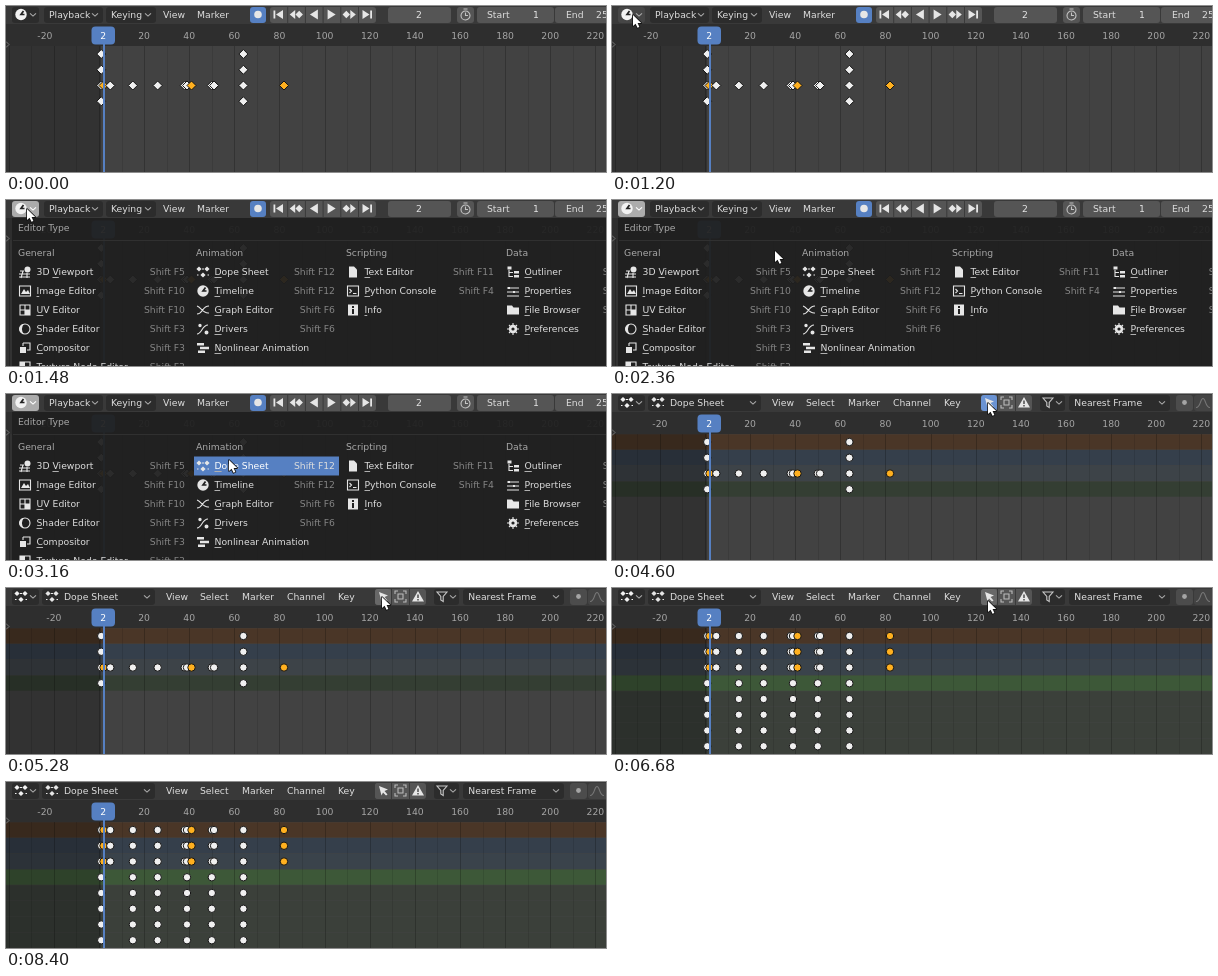
Recreate the animation shown at these times as an HTML page with a canvas. Size 600 by 166 pixels, loop 8840 ms.

```html
<!DOCTYPE html>
<html lang="en">
<head>
<meta charset="utf-8">
<title>Timeline to Dope Sheet</title>
<style>
html, body { margin: 0; width: 100%; height: 100%; overflow: hidden; background: #393939; }
canvas { display: block; }
</style>
</head>
<body>
<canvas id="stage" width="600" height="166"></canvas>
<script>
const c = document.getElementById('stage').getContext('2d');
const LOOP = 8840, STEP = 40;
const BLUE = '#5680c2', WHITE = '#e6e6e6', YELLOW = '#ffb01f';
const MENU_OPEN = 1480, SWITCH = 3320, TIP = 5120, PRESS = 5280, EXPAND = 5320, LEAVE = 6680;

// Each icon: [filled path, stroked path], centred on 0,0.
const dot = (x, y, r) => `M${x - r} ${y}a${r} ${r} 0 1 0 ${2 * r} 0a${r} ${r} 0 1 0 ${-2 * r} 0z`;
const diamond = (x, y, r) => `M${x} ${y - r}l${r} ${r}l${-r} ${r}l${-r} ${-r}z`;
const ICONS = {
  viewport: [dot(2.5, -2.5, 3), 'M-6 2H5M-6 5H5M-2 -1L-4 6M2 1V6M-5 -1H-1'],
  image: ['M-4 3l3 -5l2 3l2 -2l2 4z', 'M-5.5 -5H5.5V5H-5.5z'],
  uv: ['M0 0h5v5h-5z', 'M-5 -5H5V5H-5zM0 -5V5M-5 0H5'],
  shader: ['M-1 -5a5 5 0 0 0 0 10a7 7 0 0 1 0 -10z', dot(0, 0, 5)],
  compositor: ['M-5 -1h6v6h-6z', 'M-2 -5H5V2H2M-2 -5V-2'],
  texture: ['M-5 -5h5v5h5v5h-5v-5h-5z', 'M-5 -5H5V5H-5z'],
  dope: [diamond(-4, -3, 2.6) + diamond(4, -3, 2.6) + diamond(0, 3, 2.6), 'M-1 -3H1M-6 3H-4.5M4.5 3H6'],
  clock: [dot(0, 0, 5.7), ''],
  graph: ['', 'M-6 4C0 4 -1 -4 6 -4M-6 -4C-2 -3 0 4 6 3'],
  driver: [dot(3.5, 3.5, 2) + dot(-3, -3.5, 1.7), 'M-6 5C-1 5 -1 -4 5 -4'],
  nla: ['M-6 -5h7v2.6h-7zM-3 -1.3h9v2.6h-9zM-5 2.4h7v2.6h-7z', ''],
  text: ['M-4 -5.5h5l3 3v8h-8z', ''],
  console: ['', 'M-5.5 -5H5.5V5H-5.5zM-3.5 -2l2 2l-2 2M0 2.5h3.5'],
  info: ['M-5 -5.5h10v11h-10zM-1 -4v2h2v-2zM-1 -1v5h2v-5z', ''],
  outliner: ['M-5.5 -5.5h4v3h-4zM1 -1h5v2.4h-5zM1 3h5v2.4h-5z', 'M-4 -2V4.5H0M-4 .5H0'],
  properties: ['M-5 -4h2v2h-2zM0 0h2v2h-2z', 'M-6 -3H6M-6 1H6M-6 5H6'],
  folder: ['M-6 -4.5h5l1.5 2h5.5v7h-12z', ''],
  gear: [dot(0, 0, 4.2) + dot(0, 0, 1.6), 'M0 -6V-3M0 3V6M-6 0H-3M3 0H6M-4 -4L-2 -2M2 2L4 4M-4 4L-2 2M2 -2L4 -4'],
  chevron: ['', 'M-3 -1.2L0 1.6L3 -1.2'],
  jump: ['M-5 -4h1.8v8h-1.8zM4.5 -4.5v9l-7 -4.5z', ''],
  keyJump: ['M-1 -4.5v9l-5.5 -4.5z' + diamond(3, 0, 3.7), ''],
  play: ['M4 -5v10l-8 -5z', ''],
  stopwatch: ['', dot(0, 1, 4.5) + 'M-2 -5.5H2M0 -2V1L2.5 1'],
  pointer: ['M-4 -4.5L5 -1L1.5 .5L4.5 4L3 5L0 2L-1.5 5z', ''],
  brackets: ['', 'M-2.5 -2.5h5v5h-5zM-5.5 -2.5v-3h3M2.5 -5.5h3v3M5.5 2.5v3h-3M-2.5 5.5h-3v-3'],
  warning: ['M0 -5.5L6 5h-12zM-.8 -2v3.6h1.6v-3.6zM-.8 2.6v1.5h1.6v-1.5z', ''],
  funnel: ['', 'M-5 -4.5h10l-3.8 4.5v5l-2.4 -1.5v-3.5z'],
  ring: [dot(0, 0, 2.4), ''],
  falloff: ['', 'M-7 5C-2 5 -3 -4 0 -4S2 5 7 5'],
};

const MENU = [
  ['General', 12, 179, [['viewport', '3D Viewport', 3, 'Shift F5'], ['image', 'Image Editor', 0, 'Shift F10'],
    ['uv', 'UV Editor', 0, 'Shift F10'], ['shader', 'Shader Editor', 0, 'Shift F3'],
    ['compositor', 'Compositor', 0, 'Shift F3'], ['texture', 'Texture Node Editor', 0, 'Shift F3']]],
  ['Animation', 190, 329, [['dope', 'Dope Sheet', 0, 'Shift F12'], ['clock', 'Timeline', 0, 'Shift F12'],
    ['graph', 'Graph Editor', 0, 'Shift F6'], ['driver', 'Drivers', 0, 'Shift F6'], ['nla', 'Nonlinear Animation', 0, '']]],
  ['Scripting', 340, 488, [['text', 'Text Editor', 0, 'Shift F11'], ['console', 'Python Console', 0, 'Shift F4'],
    ['info', 'Info', 0, '']]],
  ['Data', 500, 632, [['outliner', 'Outliner', 0, 'Shift F9'], ['properties', 'Properties', 0, 'Shift F7'],
    ['folder', 'File Browser', 0, 'Shift F1'], ['gear', 'Preferences', 0, '']]],
];

// Pointer path: time, x, y, power of the easing (negative eases out).
const PATH = [
  [400, 70, 170, 1], [920, 13, 5, -1.8], [1040, 13, 5, 1], [1200, 21, 9, -1.5], [2040, 21, 9, 1],
  [2360, 163, 51, 1.3], [2640, 217, 71, -2], [2880, 214, 62, -2], [3120, 214, 62, 1], [3160, 223, 66, 1],
  [3280, 223, 66, 1], [3320, 223, 70, 1], [3760, 223, 70, 1], [3960, 228, 83, 1.4], [4600, 376, 9, -2],
  [6640, 376, 9, 1], [6680, 376, 13, 1], [7160, 602, 168, 1.5],
];

// Keyed animation frames; negative marks a selected key.
const ENDS = [1, 64];
const ALL = [1, -2, 5, 15, 26, 38, 39, -41, 50, 51, 64, -82];
const BONES = [1, 15, 26, 39, 50, 64];
const frameX = f => 93 + f * 2.256;

function pointerAt(t) {
  const i = PATH.findIndex(p => p[0] > t);
  if (i < 1) return null;
  const [t0, x0, y0] = PATH[i - 1], [t1, x1, y1, k] = PATH[i];
  const p = (t - t0) / (t1 - t0), e = k > 0 ? p ** k : 1 - (1 - p) ** -k;
  return [x0 + (x1 - x0) * e, y0 + (y1 - y0) * e];
}

function rect(x, y, w, h, fill, r = 0) {
  c.fillStyle = fill;
  c.beginPath();
  c.roundRect(x, y, w, h, r);
  c.fill();
}

function text(s, x, y, fill = '#dedede', align = 'left') {
  c.font = '9.25px "DejaVu Sans", sans-serif';
  c.textAlign = align;
  c.fillStyle = fill;
  c.fillText(s, x, y + 3.3);
}

function icon(name, x, y, color = WHITE, flip = 1) {
  const [fill, stroke] = ICONS[name];
  c.save();
  c.translate(x, y);
  c.scale(flip, 1);
  c.fillStyle = c.strokeStyle = color;
  c.lineWidth = 1.1;
  c.fill(new Path2D(fill), 'evenodd');
  c.stroke(new Path2D(stroke));
  if (name === 'clock') {
    c.strokeStyle = '#222';
    c.lineWidth = 1.7;
    c.stroke(new Path2D('M2.5 -3.5L0 0H3.5'));
  }
  c.restore();
}

const button = (x, w, fill = '#555') => rect(x, 1, w, 16, fill, 3);

function dropdown(label, x, w, textX) {
  button(x, w, '#2c2c2c');
  text(label, textX, 8.5);
  icon('chevron', x + w - 8, 8.5, '#aaa');
}

function editorButton(name, fill, arrow = '#aaa') {
  button(6, 27, fill);
  icon(name, 15, 8.5, '#f2f2f2');
  icon('chevron', 27, 8.5, arrow);
}

function timelineHeader(t) {
  if (t >= MENU_OPEN) editorButton('clock', '#acacac', '#fff');
  else editorButton('clock', t >= 880 ? '#464646' : '#2c2c2c');
  dropdown('Playback', 38, 59, 43);
  dropdown('Keying', 100, 50, 105);
  text('View', 157, 8.5);
  text('Marker', 191, 8.5);
  button(244, 16, BLUE);
  c.fillStyle = WHITE;
  c.fill(new Path2D(dot(252, 8.5, 3.8)));
  button(264, 106);
  ['jump', 'keyJump', 'play', 'play', 'keyJump', 'jump'].forEach((name, i) => {
    if (i) rect(263.5 + i * 17.7, 1, 1, 16, '#3a3a3a');
    icon(name, 272.5 + i * 17.7, 8.5, WHITE, i < 3 ? 1 : -1);
  });
  button(382, 63);
  text('2', 413, 8.5, WHITE, 'center');
  button(451, 17);
  icon('stopwatch', 459.5, 8.5, '#c4c4c4');
  button(471, 77);
  text('Start', 481, 8.5);
  text('1', 533, 8.5, WHITE, 'right');
  button(549, 70);
  text('End', 560, 8.5);
  text('250', 590, 8.5);
}

function dopeHeader(t) {
  editorButton('dope', '#2c2c2c');
  dropdown('Dope Sheet', 36, 113, 58);
  icon('dope', 46, 8.5);
  [['View', 160], ['Select', 194], ['Marker', 236], ['Channel', 281], ['Key', 332]]
    .forEach(([label, x]) => text(label, x, 8.5));
  button(369, 51);
  const hover = t >= 4520 && t < LEAVE + 80;
  button(369, 16, t < PRESS ? (hover ? '#6a93d3' : BLUE) : hover ? '#686868' : '#555');
  rect(385, 1, 1, 16, '#3a3a3a');
  rect(403, 1, 1, 16, '#3a3a3a');
  icon('pointer', 377, 8.5);
  icon('brackets', 394.5, 8.5, '#bbb');
  icon('warning', 412, 8.5);
  button(428, 25, '#2c2c2c');
  icon('funnel', 436, 8.5, '#c8c8c8');
  icon('chevron', 447, 8.5, '#aaa');
  dropdown('Nearest Frame', 457, 101, 462.3);
  button(564, 17, '#4c4c4c');
  icon('ring', 572.5, 8.5, '#a4a4a4');
  button(582, 24, '#444');
  icon('falloff', 591, 8.5, '#777');
}

function key(frame, y, round) {
  const x = frameX(Math.abs(frame));
  c.fillStyle = frame < 0 ? YELLOW : '#f0f0f0';
  c.strokeStyle = '#151515';
  c.lineWidth = 1;
  const shape = new Path2D(round ? dot(x, y, 3.7) : diamond(x, y, 4.5));
  c.fill(shape);
  c.stroke(shape);
}

function editor(t) {
  const round = t >= SWITCH, expanded = t >= EXPAND, rowY = i => 48 + i * 15.75;
  rect(0, 18, 600, 148, '#424242');
  if (round) {
    const tints = expanded
      ? ['#4a3627', '#353f4b', '#3a434b', '#3d5838', '#3b403a', '#3b403a', '#3b403a', '#3b403a']
      : ['#4a3627', '#353f4b', '#3d4348', '#343e33'];
    tints.forEach((tint, i) => rect(0, rowY(i) - 7.8, 600, 15.3, tint));
  }
  rect(0, 40, 95, 126, 'rgba(0,0,0,.25)');
  for (let f = -40; f <= 220; f += 10)
    rect(Math.round(frameX(f)), 40, 1, 126, f % 20 ? 'rgba(0,0,0,.1)' : 'rgba(0,0,0,.22)');

  rect(0, 18, 600, 22, '#2e2e2e');
  const blink = t >= 160 && t < 280 || t >= 8320 && t < 8400;
  const shifted = (t < SWITCH || t >= LEAVE + 40) && !blink;
  for (let f = -20; f <= 220; f += 20)
    if (f) text(f, frameX(f) - (f < 0 && shifted ? 9 : 0), 30, '#a6a6a6', 'center');

  const rows = expanded ? [ALL, ALL, ALL, BONES, BONES, BONES, BONES, BONES] : [ENDS, ENDS, ALL, ENDS];
  rows.forEach((row, i) => row.forEach(frame => key(frame, rowY(i), round)));
  rect(97, 38, 2, 128, BLUE);
  rect(85.5, 20.5, 23.5, 18, BLUE, 4);
  text('2', 97.3, 29.8, '#fff', 'center');
  c.strokeStyle = '#777';
  c.lineWidth = 1;
  c.stroke(new Path2D('M0 35.5L3 38.5L0 41.5'));
}

function menu(pointer) {
  rect(6, 18, 600, 150, 'rgba(31,31,31,.94)');
  text('Editor Type', 12, 28, '#a8a8a8');
  rect(7, 40, 593, 1, '#303030');
  for (const [title, x, right, items] of MENU) {
    text(title, x, 53, '#a8a8a8');
    items.forEach(([name, label, mark, shortcut], i) => {
      const y = 72 + i * 19, labelX = x + 18.5;
      const hover = pointer[0] >= x - 3 && pointer[0] < right + 4 && Math.abs(pointer[1] - y) < 9.5;
      if (hover) rect(x - 2, y - 9.5, right - x + 6, 19, BLUE);
      icon(name, x + 7, y);
      text(label, labelX, y, hover ? '#fff' : '#dedede');
      const before = c.measureText(label.slice(0, mark)).width;
      rect(labelX + before, y + 5, c.measureText(label[mark]).width, 1, '#b0b0b0');
      text(shortcut, right, y, hover ? '#ddd' : '#858585', 'right');
    });
  }
}

function tooltip() {
  rect(353, 27, 260, 42, 'rgba(0,0,0,.25)', 4);
  rect(356, 26, 260, 39, '#191919', 4);
  text('Only include channels relating to selected objects and data.', 363, 37);
  text('Python: DopeSheet.show_only_selected', 363, 54, '#858585');
}

function cursor([x, y]) {
  const arrow = new Path2D('M0 0V11L2.6 8.8L4.5 12.8L6.4 11.9L4.6 8.1H8.2z');
  c.save();
  c.translate(x, y);
  c.lineJoin = 'round';
  c.strokeStyle = '#111';
  c.lineWidth = 1.6;
  c.stroke(arrow);
  c.fillStyle = '#fff';
  c.fill(arrow);
  c.restore();
}

function draw(now) {
  const t = Math.floor(now % LOOP / STEP) * STEP;
  const pointer = pointerAt(t);
  editor(t);
  rect(0, 0, 600, 18, '#393939');
  (t < SWITCH ? timelineHeader : dopeHeader)(t);
  if (t >= MENU_OPEN && t < SWITCH) menu(pointer);
  if (t >= TIP && t < PRESS) tooltip();
  if (pointer) cursor(pointer);
  requestAnimationFrame(draw);
}
requestAnimationFrame(draw);
</script>
</body>
</html>
```
